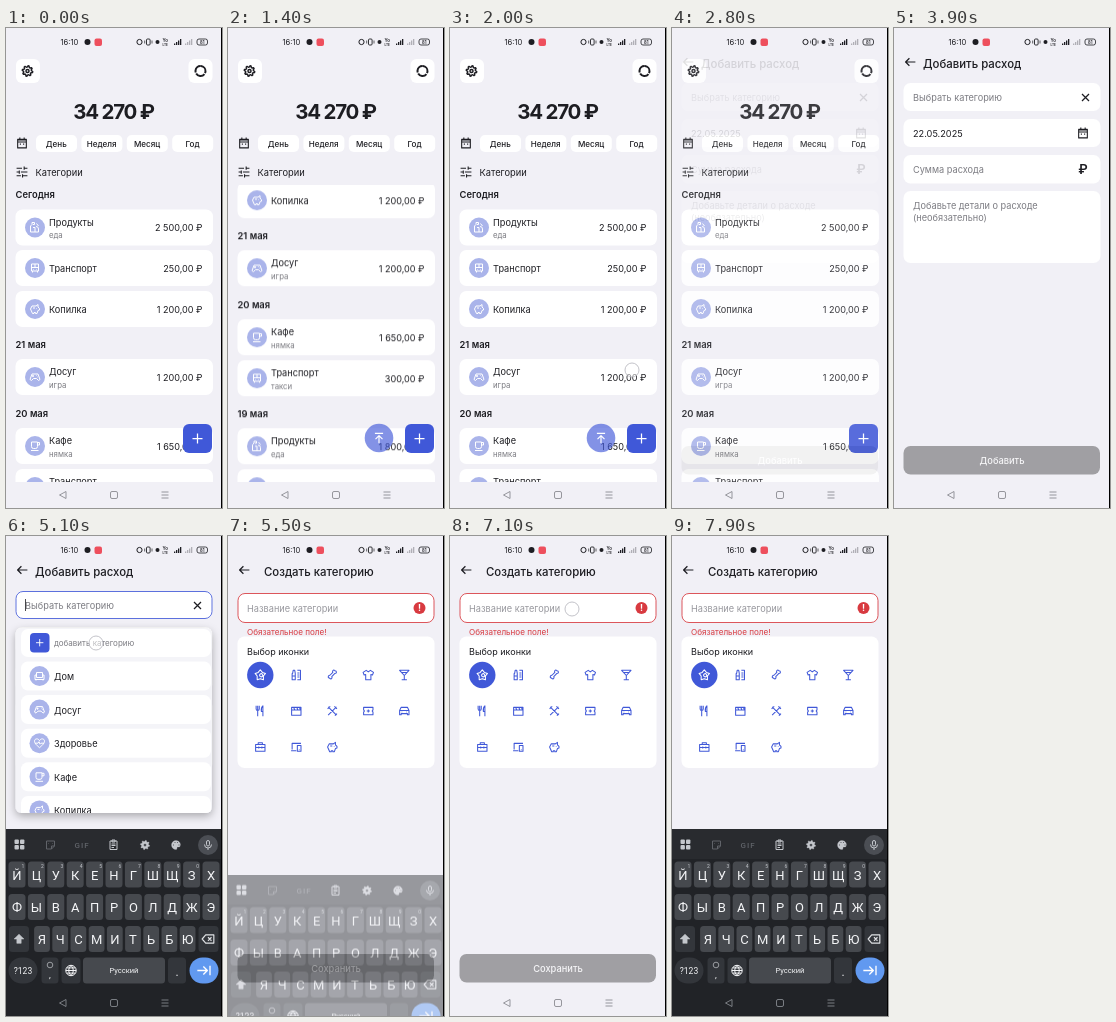
Animation of 216 by 480 pixels, one loop 8 s. Source, as an HTML page:

```html
<!DOCTYPE html>
<html lang="ru">
<head>
<meta charset="utf-8">
<title>Учёт расходов</title>
<style>
html, body { margin: 0; width: 100%; height: 100%; overflow: hidden; background: #f1f0f6; }
svg { display: block; width: 100vw; height: 100vh; }
text { font-family: Inter, sans-serif; }
.kb text { font-family: Roboto, sans-serif; }
.anim { animation: 8s linear infinite both; }
.scroll { animation-name: scroll; }
.up { animation-name: up; }
.add { animation-name: add; }
.focus { animation-name: focus; }
.drop { animation-name: drop; }
.create { animation-name: create; }
.nav { animation-name: nav; }
.kb { animation-name: slide, fade; }
.touch { animation-name: touch; }
@keyframes scroll {
  0%, 13.3% { transform: none; animation-timing-function: cubic-bezier(.33,.67,.67,1); }
  18%, 19.4% { transform: translateY(-110px); animation-timing-function: cubic-bezier(.33,.2,.5,1); }
  24.6%, 100% { transform: none; }
}
@keyframes up {
  0%, 15% { opacity: 0; }
  17.5%, 28.1% { opacity: 1; }
  32.5%, 100% { opacity: 0; }
}
@keyframes add { 0%, 34.4% { opacity: 0; } 38.75%, 100% { opacity: 1; } }
@keyframes focus { 0%, 51.2% { opacity: 0; } 51.3%, 100% { opacity: 1; } }
@keyframes drop { 0%, 52% { opacity: 0; } 54.2%, 100% { opacity: 1; } }
@keyframes create { 0%, 64% { opacity: 0; } 67.2%, 100% { opacity: 1; } }
@keyframes nav {
  0%, 52% { opacity: 1; }
  54%, 69.5% { opacity: 0; }
  70.7%, 89.4% { opacity: 1; }
  91%, 100% { opacity: 0; }
}
@keyframes slide {
  0%, 51.625% { transform: translateY(188px); animation-timing-function: cubic-bezier(.33,.67,.67,1); }
  57.25%, 66.875% { transform: none; animation-timing-function: cubic-bezier(.33,0,.67,.33); }
  70.7%, 89.4% { transform: translateY(188px); animation-timing-function: cubic-bezier(.33,.67,.67,1); }
  95.6%, 100% { transform: none; }
}
@keyframes fade {
  0%, 66.875% { opacity: 1; }
  70.3%, 70.8% { opacity: 0; }
  71%, 100% { opacity: 1; }
}
@keyframes touch {
  0%, 13.3% { opacity: 0; transform: translate(182px, 390px); }
  13.5% { opacity: 1; transform: translate(182px, 390px); }
  16% { opacity: 1; transform: translate(182px, 280px); }
  16.6%, 19.2% { opacity: 0; transform: translate(182px, 235px); }
  19.5% { opacity: 1; transform: translate(182px, 235px); }
  24.8%, 25.4% { opacity: 1; transform: translate(182px, 342px); }
  26%, 31% { opacity: 0; transform: translate(190px, 410px); }
  31.5%, 34% { opacity: 1; transform: translate(190px, 410px); }
  35%, 49.2% { opacity: 0; transform: translate(110px, 70px); }
  49.8%, 51% { opacity: 1; transform: translate(110px, 70px); }
  52%, 63% { opacity: 0; transform: translate(90px, 107px); }
  63.5%, 64.5% { opacity: 1; transform: translate(90px, 107px); }
  65.5%, 88% { opacity: 0; transform: translate(122px, 73px); }
  88.6%, 89.8% { opacity: 1; transform: translate(122px, 73px); }
  90.8%, 100% { opacity: 0; transform: translate(122px, 73px); }
}
</style>
</head>
<body>
<svg id="stage" viewBox="0 0 216 480" preserveAspectRatio="none"></svg>
<script>
const INK = '#1d1d22', GREY = '#7c7c82', BLUE = '#4058d8', PALE = '#aab4ea', RED = '#d83a40', PAGE = '#f1f0f6';

// Outlines on a 24 unit grid
const paths = {
  plus: 'M12 4v16M4 12h16',
  back: 'M21 12H3M10 5l-7 7 7 7',
  close: 'M5 5l14 14M19 5L5 19',
  calendar: 'M4 5h16v16H4zM4 6.5h16M4 10h16M8 2v4M16 2v4M8 14h2M14 14h2',
  tune: 'M2 5h10M16 5h6M16 2v6M2 12h4M10 12h12M7 9v6M2 19h8M14 19h8M13 16v6',
  top: 'M5 4h14M12 21V8M6 14l6-6 6 6',
  food: 'M3 9l3-3V2h5v4h-3M3 9v12h9V12H8M14 10a5 5 0 0 1 5 5v6h-7M15 4l4 5',
  bus: 'M5 4h14v14H5zM5 11h14M12 4v7M7 18v3M17 18v3M8 15h1M15 15h1',
  pig: 'M6 6h8l4-3v5l3 3v3l-3 1-2 6h-3v-2h-3v2H7L3 12zM15 11h1M8 10h4',
  pad: 'M6 6h12l4 11-3 2-4-4H9l-4 4-3-2zM8 8v4M6 10h4M15 9h1M17 12h1',
  cup: 'M5 4h12v9a4 4 0 0 1-4 4H9a4 4 0 0 1-4-4zM17 5h4v5h-4M4 21h15',
  sofa: 'M6 10V5h12v5M3 10h3v5h12v-5h3v9H3zM5 19v2M19 19v2',
  heart: 'M12 21C5 15 2 12 2 8c0-6 8-6 10-1 2-5 10-5 10 1 0 4-3 7-10 13M3 12h6l2-3 2 5 2-2h6',
  flower: 'M12 2l4 5 6 2-4 5 0 7-6-2-6 2 0-7-4-5 6-2zM12 10a3 3 0 1 1 0 5 3 3 0 0 1 0-5',
  bottle: 'M5 9l1-6h3l1 6v12H4V9zM4 14h6M14 3h6v18h-6M14 8h4M14 12h4M14 16h4',
  bone: 'M8 12l5-5c-2-4 3-6 4-3 4 0 4 5 0 5l-6 6c2 4-3 6-4 3-4 0-4-5 1-6z',
  shirt: 'M8 3l4 3 4-3 6 4-2 5-3-1v10H7V11l-3 1-2-5z',
  cocktail: 'M3 3h18l-9 10zM12 13v8M7 21h10M6 7h12',
  fork: 'M4 2v6q0 3 3 3t3-3V2M7 2v20M17 22V2q-4 3-3 11h3',
  film: 'M3 5h18v15H3zM3 10h18M7 5l2 5M13 5l2 5M18 5l2 5',
  tools: 'M4 4l16 16M4 20L20 4M3 8l5-5M16 3l5 5M17 21l4-4',
  ticket: 'M3 5h18v5q-3 2 0 4v5H3v-5q3-2 0-4zM12 9v6M9 12h6',
  car: 'M3 19v-8l3-6h12l3 6v8h-3v-2H6v2zM3 11h18M7 14h1M16 14h1',
  bag: 'M3 7h18v13H3zM8 7V4h8v3M3 13h18M9 11v4M15 11v4',
  devices: 'M4 17V5h17M2 19h10M14 9h7v11h-7zM17 17h1',
  board: 'M5 4h14v17H5zM9 2h6v4H9zM8 10h8M8 13h8M8 17h5',
  sticker: 'M4 4h16v10l-6 6H4zM14 20v-6h6M8 9h1M15 9h1',
  mic: 'M12 3a3 3 0 0 1 3 3v5a3 3 0 0 1-6 0V6a3 3 0 0 1 3-3M5 11a7 7 0 0 0 14 0M12 18v4',
  shift: 'M12 3l9 9h-5v8H8v-8H3z',
  erase: 'M8 5h14v14H8l-6-7zM12 9l6 6M18 9l-6 6',
  globe: 'M12 2a10 10 0 1 1 0 20a10 10 0 1 1 0-20M2 12h20M12 2q-9 10 0 20M12 2q9 10 0 20M4 7h16M4 17h16',
  enter: 'M2 12h15M11 6l6 6-6 6M21 5v14',
  palette: 'M12 3a9 9 0 1 0 0 18c3 0 1-4 3-5h4c5-6-1-13-7-13M6 11h2v2H6zM9 6h2v2H9zM14 6h2v2h-2zM17 11h2v2h-2z',
};
paths.gear = 'M' + Array.from({ length: 32 }, (_, i) => {
  const r = i % 4 < 2 ? 10 : 7.5, a = (i + .5) * Math.PI / 16;
  return (12 + r * Math.cos(a)).toFixed(1) + ' ' + (12 + r * Math.sin(a)).toFixed(1);
}).join('L') + 'zM12 9a3 3 0 1 1 0 6a3 3 0 1 1 0-6';

const icon = (name, x, y, size, color = INK, weight = 2, fill = 'none') =>
  `<path d="${paths[name]}" transform="translate(${x - size / 2} ${y - size / 2}) scale(${size / 24})"
    fill="${fill}" fill-rule="evenodd" stroke="${color}" stroke-width="${weight}" stroke-linejoin="round"/>`;
const box = (x, y, w, h, r = 7, fill = '#fff', more = '') =>
  `<rect x="${x}" y="${y}" width="${w}" height="${h}" rx="${r}" fill="${fill}" ${more}/>`;
const dot = (x, y, r, fill, more = '') => `<circle cx="${x}" cy="${y}" r="${r}" fill="${fill}" ${more}/>`;
// y is the middle of the capitals
const text = (str, x, y, size = 9.2, weight = 400, fill = INK, anchor = 'start', more = '') =>
  `<text x="${x}" y="${y + .6 + size * .36}" text-anchor="${anchor}" ${more}
    style="font-size:${size}px;font-weight:${weight};fill:${fill}">${str}</text>`;
const badge = (name, x, y) => dot(x, y, 10, PALE) + icon(name, x, y, 12, '#fff');

function expense(y, name, pic, sum, note) {
  return box(9.5, y - 18, 197.5, 36) + badge(pic, 29, y) +
    text(name, 43, note ? y - 5.5 : y) + (note ? text(note, 43, y + 7.5, 7.8, 400, GREY) : '') +
    text(sum + ',00 ₽', 196.5, y, 9.1, 400, INK, 'end');
}
const day = (name, y) => text(name, 9.5, y, 9.4, 600);

function home() {
  const chips = ['День', 'Неделя', 'Месяц', 'Год'].map((name, i) =>
    box(30 + i * 45.4, 107, 41, 17, 5) + text(name, 50.3 + i * 45.4, 115.5, 8.1, 500, INK, 'middle')).join('');
  return box(10, 31, 24, 24, 6) + icon('gear', 21.5, 43, 12.5, INK, 2.8) +
    box(182.5, 31, 24, 24, 6) +
    dot(194.5, 43, 5, 'none', `stroke="${INK}" stroke-width="2" stroke-dasharray="9.47 1" transform="rotate(-85 194.5 43)"`) +
    text('34 270 ₽', 107.5, 83, 20.5, 700, INK, 'middle', 'letter-spacing="-1.25"') +
    icon('calendar', 16, 115, 13) + chips +
    icon('tune', 16, 144, 13) + text('Категории', 29.5, 144.5, 9.3) +
    `<g clip-path="url(#list)"><g class="anim scroll">` +
    day('Сегодня', 166.5) +
    expense(199.5, 'Продукты', 'food', '2 500', 'еда') +
    expense(240, 'Транспорт', 'bus', '250') +
    expense(281, 'Копилка', 'pig', '1 200') +
    day('21 мая', 316) + expense(349, 'Досуг', 'pad', '1 200', 'игра') +
    day('20 мая', 385) + expense(418, 'Кафе', 'cup', '1 650', 'нямка') +
    expense(459, 'Транспорт', 'bus', '300', 'такси') +
    day('19 мая', 494) + expense(527, 'Продукты', 'food', '1 800', 'еда') +
    expense(568, 'Дом', 'sofa', '900') +
    `</g></g><g class="anim up">${dot(151, 410, 14.3, BLUE, 'fill-opacity=".65"')}${icon('top', 151, 410, 14, '#fff')}</g>` +
    box(177, 396, 29, 29, 6, BLUE) + icon('plus', 191.5, 410.5, 15, '#fff');
}

const header = (title, x) => box(0, 0, 216, 480, 0, PAGE) + icon('back', 16.5, 34, 13, INK, 2.3) + text(title, x, 35, 11.4, 500);
const button = label => box(9.5, 418, 196.5, 28.5, 7, '#a09fa3') + text(label, 108, 432.5, 9.3, 500, '#f5f5f7', 'middle');

function addScreen() {
  const items = [['Дом', 'sofa'], ['Досуг', 'pad'], ['Здоровье', 'heart'], ['Кафе', 'cup'], ['Копилка', 'pig']];
  const rows = items.map(([name, pic], i) => {
    const y = 140 + i * 33.6;
    return box(15, y - 14.5, 190, 29) + badge(pic, 33.5, y) + text(name, 48, y);
  }).join('');
  return header('Добавить расход', 29) +
    box(9.5, 55, 197, 28) + text('Выбрать категорию', 19, 69, 9.2, 400, GREY) +
    box(9.5, 91, 197, 28) + text('22.05.2025', 19, 105) + icon('calendar', 189, 105, 13) +
    box(9.5, 127, 197, 28.5) + text('Сумма расхода', 19, 141.5, 9.2, 400, GREY) + text('₽', 189, 141, 13, 600, INK, 'middle') +
    box(9.5, 163, 197, 72) + text('Добавьте детали о расходе', 19, 177, 9.2, 400, GREY) +
    text('(необязательно)', 19, 189.5, 9.2, 400, GREY) + button('Добавить') +
    `<g class="anim focus">${box(10, 55.5, 196, 27, 7, 'none', `stroke="${BLUE}" stroke-opacity=".85"`)}${box(19, 63, .8, 12, 0, INK)}</g>` +
    icon('close', 191.5, 69.5, 12, INK, 2.5) +
    `<g class="anim drop">${box(9.5, 92, 196.5, 185, 6, '#f4f4f8', 'filter="url(#shadow)"')}<g clip-path="url(#menu)">` +
    box(15, 93, 190, 28) + box(24, 97, 19.5, 19.5, 4, BLUE) + icon('plus', 33.7, 106.7, 11, '#fff') +
    text('добавить категорию', 48, 107, 8, 400, GREY) + rows + '</g></g>';
}

function createScreen() {
  const names = 'flower bottle bone shirt cocktail fork film tools ticket car bag devices pig'.split(' ');
  const grid = names.map((name, i) =>
    icon(name, 32.3 + i % 5 * 36, 139 + Math.floor(i / 5) * 36, 12.5, i ? BLUE : '#fff')).join('');
  return header('Создать категорию', 36) +
    box(10, 57.5, 196, 29, 7, '#fff', `stroke="${RED}" stroke-opacity=".85"`) + text('Название категории', 19, 72.5, 9.2, 400, '#98989e') +
    dot(191.5, 72, 6, RED) + text('!', 191.5, 71.4, 9, 700, '#fff', 'middle') +
    text('Обязательное поле!', 19, 95.5, 8.1, 400, RED) +
    box(9.5, 100.5, 197, 131.5) + text('Выбор иконки', 19, 115, 9) +
    dot(32.3, 139, 13.2, BLUE) + grid + button('Сохранить');
}

function navBar(color) {
  const line = `fill="none" stroke="${color}" stroke-width=".9"`;
  return `<path d="M60 463.5v7l-6.5-3.5z" ${line}/>` + box(104.5, 463.5, 7, 7, 1.5, 'none', `stroke="${color}" stroke-width=".9"`) +
    `<path d="M155.5 464h7M155.5 467h7M155.5 470h7" ${line}/>`;
}

function keyboard() {
  const KEY = '#46494e', DIM = '#33363b', SOFT = '#c4c7cc';
  const key = (x, y, w, fill = KEY, r = 3.5) => box(x - w / 2, y - 13, w, 26, r, fill);
  const label = (str, x, y, size = 13) => text(str, x, y, size, 400, '#f4f5f7', 'middle');
  const row = (letters, x, step, y) => [...letters].map((c, i) =>
    key(x + i * step, y, step - 2.4) + label(c, x + i * step, y)).join('');
  const hints = [...'1234567890'].map((c, i) =>
    text(c, 17 + i * 19.4, 329.5, 5, 400, SOFT, 'middle')).join('');
  const tiles = [0, 1, 2, 3].map(i => box(8.5 + i % 2 * 5.5, 303.5 + (i >> 1) * 5.5, 4.4, 4.4, 1, SOFT)).join('');
  return box(0, 293, 216, 190, 0, '#212327') + box(0, 293, 216, 30, 0, '#292b2f') +
    tiles + icon('sticker', 44.5, 309, 12, '#606369') + text('GIF', 76, 308.5, 8, 500, '#606369', 'middle', 'letter-spacing="1"') +
    icon('board', 107.5, 309, 12, SOFT) + icon('gear', 139, 309, 11, SOFT, 1, SOFT) + icon('palette', 170, 309, 12, SOFT, .5, SOFT) +
    dot(202, 309, 10, '#4b4e54') + icon('mic', 202, 309, 12, SOFT) +
    row('ЙЦУКЕНГШЩЗХ', 11, 19.4, 338.5) + hints + row('ФЫВАПРОЛДЖЭ', 11, 19.4, 371) +
    key(13, 403, 20, DIM) + icon('shift', 13, 403, 13, SOFT, 1, SOFT) + row('ЯЧСМИТЬБЮ', 36, 18.2, 403) +
    key(202.5, 403, 20, DIM) + icon('erase', 202, 403, 14, '#e0e2e5') +
    key(17, 434.5, 29, DIM, 13) + label('?123', 17, 434.5, 8.5) +
    key(44, 434.5, 17, DIM) + dot(44, 429, 2.8, 'none', `stroke="${SOFT}" stroke-width=".7"`) + label(',', 44, 438, 9) +
    key(65, 434.5, 19, DIM) + icon('globe', 65, 434.5, 12.5, '#f4f5f7', 1.9) +
    key(118, 434.5, 82) + label('Русский', 118, 434, 7.5) +
    key(171, 434.5, 18, DIM) + label('.', 171, 435, 12) +
    key(198, 434.5, 29, '#6199f0', 13) + icon('enter', 198, 434.5, 16, '#fff') +
    navBar('#85888e');
}

function statusBar() {
  const bars = x => [0, 1, 2, 3].map(i => box(x + i * 2, 15.5 - i * 1.5, 1.3, 1.5 + i * 1.5, 0, INK)).join('');
  return text('16:10', 54.5, 13.6, 7.6) + dot(81.5, 14, 3, INK) + box(88.5, 10.5, 7.5, 7.5, 2, '#ee4f5d') +
    dot(133.5, 14, 2.6, 'none', `stroke="${INK}"`) + box(140.5, 11, 3.6, 6, 1, 'none', `stroke="${INK}" stroke-width=".9"`) +
    `<path d="M138.7 12.5v3M146 12.5v3" stroke="${INK}" stroke-width=".7"/>` + dot(151.5, 14, 2, INK) +
    text('Yo', 156.5, 12, 4.5, 600) + text('LTE', 156.5, 15.8, 3.2, 600) + bars(168) +
    `<g opacity=".3">${bars(179)}</g>` + box(191, 11, 10.5, 6, 2, 'none', `stroke="${INK}" stroke-width=".8"`) +
    text('81', 196.2, 13.4, 4.2, 600, INK, 'middle');
}

document.getElementById('stage').innerHTML = `
  <defs>
    <clipPath id="list"><rect y="157" width="216" height="297"/></clipPath>
    <clipPath id="menu"><rect x="9.5" y="92" width="196.5" height="185" rx="6"/></clipPath>
    <filter id="shadow"><feDropShadow dx="0" dy="3" stdDeviation="4" flood-opacity=".3"/></filter>
  </defs>
  ${box(0, 0, 216, 480, 0, PAGE)}
  ${home()}
  <g class="anim add">${addScreen()}</g>
  <g class="anim create">${createScreen()}</g>
  ${statusBar()}
  <g class="anim nav">${navBar('#8c8c92')}</g>
  <g class="anim kb">${keyboard()}</g>
  <g class="anim touch">${dot(0, 0, 7, '#fff', 'fill-opacity=".5" stroke="#b4b4bc" stroke-width=".8"')}</g>
  ${box(215, 0, 1, 480, 0, '#000')}`;
</script>
</body>
</html>
```
